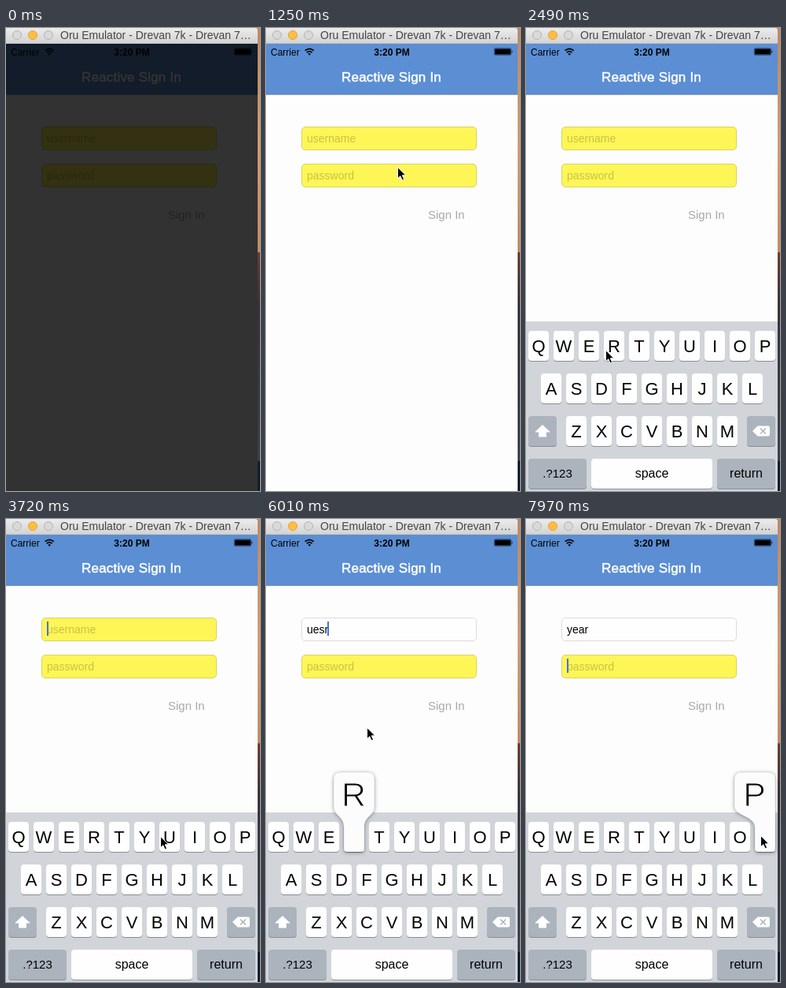
Animation, 323 px wide and 587 px high, one loop 8000 ms. Source, as an HTML page:

```html
<!DOCTYPE html>
<html lang="en">
<head>
<meta charset="utf-8">
<title>Sign in</title>
<style>
html, body { margin: 0; width: 100%; height: 100%; overflow: hidden; background: #fff; }
svg { display: block; width: 323px; height: 587px; font-family: "Liberation Sans", Arial, sans-serif; }
.mid { text-anchor: middle; }
.hint { fill: #c9c246; font-size: 14px; }
.value { fill: #000; font-size: 14px; }
.big { font-size: 43px; stroke: #fcfcfc; stroke-width: 1.2px; }
</style>
</head>
<body>
<svg viewBox="0 0 323 587">
  <defs>
    <linearGradient id="bar" x2="0" y2="1"><stop stop-color="#ececec"/><stop offset="1" stop-color="#d2d2d2"/></linearGradient>
    <linearGradient id="desk" x2="0" y2="1">
      <stop stop-color="#bd8862"/><stop offset=".25" stop-color="#d49c6f"/>
      <stop offset=".484" stop-color="#c58b60"/><stop offset=".485" stop-color="#6d3d32"/>
      <stop offset=".6" stop-color="#38323a"/><stop offset=".935" stop-color="#3b414e"/>
      <stop offset=".936" stop-color="#101d2e"/><stop offset="1" stop-color="#101d2e"/>
    </linearGradient>
    <filter id="soft" x="-30%" y="-30%" width="160%" height="160%">
      <feDropShadow dx="0" dy="1" stdDeviation="2.6" flood-color="#000" flood-opacity=".36"/>
    </filter>
  </defs>

  <rect width="323" height="587" fill="url(#desk)"/>
  <rect y="20" width="320" height="567" fill="#fdfdfd"/>
  <rect y="20" width="320" height="64" fill="#5b8ed3"/>
  <rect y="84" width="320" height="1" fill="#8a9db8"/>

  <text x="6" y="35" font-size="12">Carrier</text>
  <g fill="none" stroke="#000" stroke-width="1.7">
    <path d="M49.6 28.6q5.6-4.6 11.2 0M51.8 31q3.4-2.8 6.8 0"/>
    <path d="M55.2 34.8l-1.8-2q1.8-1.4 3.6 0z" fill="#000" stroke="none"/>
  </g>
  <text class="mid" x="160" y="35" font-size="12" font-weight="700">3:20 PM</text>
  <rect x="290.250" y="25.750" width="21.500" height="8.500" rx="1.5" fill="none" stroke="#000" stroke-width=".5"/>
  <rect x="291" y="26.500" width="20" height="7" rx=".8"/>
  <path d="M312.500 28.500q2 1.500 0 3z"/>

  <g id="fields"></g>
  <text class="mid" x="159.5" y="68" font-size="17" letter-spacing=".2" fill="#fff" stroke="#fff" stroke-width=".5">Reactive Sign In</text>
  <text x="206" y="242" font-size="15" fill="#a8a8a8">Sign In</text>
  <rect id="shade" y="20" width="320" height="567"/>

  <path d="M0 0H317Q320 0 320 3V20H0z" fill="url(#bar)"/>
  <rect y="19" width="320" height="1" fill="#bfbfbf"/>
  <g stroke-width="1">
    <circle cx="14" cy="9" r="5.5" fill="#d9d9d9" stroke="#b4b4b4"/>
    <circle cx="34" cy="9" r="5.5" fill="#fdbe41" stroke="#e0a43a"/>
    <circle cx="54" cy="9" r="5.5" fill="#d9d9d9" stroke="#b4b4b4"/>
  </g>
  <text x="69" y="14" font-size="14" fill="#454545">Oru Emulator - Drevan 7k - Drevan 7…</text>

  <g id="board"></g>
  <g id="popup">
    <path fill="#fcfcfc" stroke="#000" stroke-opacity=".14" stroke-width=".6" filter="url(#soft)"/>
    <text class="mid big"></text>
  </g>
  <path id="pointer" d="M.5 .5V14.7L3.8 11.7L6.1 16.9L8.6 15.8L6.3 10.8H10.7Z" stroke="#fff" stroke-width="1"/>
</svg>

<script>
const LOOP = 8000, TICK = 177, REST = 372;
const $ = id => document.getElementById(id);

function add(parent, tag, attrs, text) {
  const el = document.createElementNS("http://www.w3.org/2000/svg", tag);
  set(el, attrs);
  if (text) el.textContent = text;
  return parent.appendChild(el);
}
function set(el, attrs) {
  for (const name in attrs) el.setAttribute(name, attrs[name]);
}
function show(el, on) { el.style.display = on ? "" : "none"; }

// Text fields
function makeField(y, placeholder) {
  const g = $("fields");
  return {
    box: add(g, "rect", { x: 45.5, y: y + .5, width: 222, height: 29, rx: 4.5 }),
    hint: add(g, "text", { x: 52, y: y + 20, class: "hint" }, placeholder),
    value: add(g, "text", { x: 52, y: y + 20, class: "value" }),
    caret: add(g, "rect", { y: y + 5, width: 2, height: 18, fill: "#4b6fdc" })
  };
}
function drawField(f, text, valid, caret) {
  set(f.box, valid ? { fill: "#fefefe", stroke: "#dcdcdc" } : { fill: "#fef656", stroke: "#d9d264" });
  f.value.textContent = text;
  show(f.hint, !text);
  show(f.caret, caret);
  if (caret) set(f.caret, { x: 52 + (text ? Math.floor(f.value.getComputedTextLength()) - 1 : 0) });
}
const user = makeField(125, "username");
const pass = makeField(172, "password");

// Keyboard, laid out at its resting height
const board = $("board"), keys = {};
add(board, "rect", { y: REST, width: 320, height: 215, fill: "#d1d5da" });
function key(x, y, w, label, size = 22, fill = "#fefefe") {
  add(board, "rect", { x, y: y + 1, width: w, height: 38, rx: 4, fill: "#898c91" });
  add(board, "rect", { x, y, width: w, height: 38, rx: 4, fill });
  add(board, "text", { x: x + w / 2, y: y + (size > 20 ? 27 : 24), class: "mid", "font-size": size }, label);
  if (label.length === 1) keys[label] = { x, y };
}
["QWERTYUIOP", "ASDFGHJKL", "ZXCVBNM"].forEach((row, r) =>
  [...row].forEach((c, i) => key([3, 19, 51][r] + 32 * i, 384 + 54 * r, 26, c)));
const GREY = "#abb3bd";
key(3, 492, 36, "", 16, GREY);
key(281, 492, 36, "", 16, GREY);
key(3, 546, 74, ".?123", 15, GREY);
key(83, 546, 154, "space", 16);
key(243, 546, 74, "return", 16, GREY);
add(board, "path", { d: "M21 503L31 512.500H26V518.500H16V512.500H11z", fill: "#fff" });
add(board, "path", { d: "M288 511L294.500 504.500H308Q310 504.500 310 506.500V515.500Q310 517.500 308 517.500H294.500z", fill: "#fff" });
add(board, "path", { d: "M298 507.500L305 514.500M305 507.500L298 514.500", stroke: GREY, "stroke-width": 1.5 });

function drawPopup(letter) {
  const g = $("popup"), k = keys[letter];
  show(g, k);
  if (!k) return;
  const { x, y } = k, l = Math.min(x - 13, 265), r = l + 52, e = x + 26, top = y - 63;
  set(g.children[0], {
    d: `M${l + 9} ${top}H${r - 9}Q${r} ${top} ${r} ${top + 9}V${y - 20}` +
       `C${r} ${y - 7} ${e} ${y - 8} ${e} ${y + 7}V${y + 34}Q${e} ${y + 38} ${e - 4} ${y + 38}` +
       `H${x + 4}Q${x} ${y + 38} ${x} ${y + 34}V${y + 7}` +
       `C${x} ${y - 8} ${l} ${y - 7} ${l} ${y - 20}V${top + 9}Q${l} ${top} ${l + 9} ${top}z`
  });
  set(g.children[1], { x: l + 25.5, y: y - 20 });
  g.children[1].textContent = letter;
}

// Pointer way points: tick, x, y
const PATH = [
  [4, 262, 276], [6, 195, 210], [8, 139, 141], [9, 134, 152], [11, 134, 152],
  [13, 106, 370], [14, 101, 408], [16, 101, 408], [18, 150, 398], [20, 194, 402],
  [22, 198, 402], [23, 198, 402], [26, 74, 397], [27, 70, 396], [28, 70, 396],
  [30, 60, 455], [31, 60, 455], [33, 112, 402], [34, 128, 264], [36, 142, 194],
  [38, 145, 186], [40, 145, 186], [43, 280, 385], [44, 298, 401], [45, 298, 401]
];
function pointerAt(n) {
  const i = Math.max(1, PATH.findIndex(p => p[0] >= n));
  const a = PATH[i - 1], b = PATH[i], u = (n - a[0]) / (b[0] - a[0]);
  return [1, 2].map(j => Math.round(a[j] + (b[j] - a[j]) * u));
}

const PRESSED = { 22: "U", 27: "E", 30: "S", 34: "R", 45: "P" };
// Value of the last entry whose tick has been reached
const latest = (list, n) => list.reduce((v, [at, next]) => n >= at ? next : v, list[0][1]);
const TYPED = [[0, ""], [23, "u"], [28, "ue"], [31, "ues"], [34, "uesr"], [40, "year"]];

function draw(t) {
  const n = Math.min(45, Math.floor((t + 12) / TICK));
  set($("shade"), { opacity: [.8, .045][n] || 0 });

  const blink = n % 5 < 3;
  drawField(user, latest(TYPED, n), n >= 34, n >= 10 && n < 39 && (blink || n === 27 || n === 34));
  drawField(pass, "", false, n >= 40 && blink);

  show(board, n >= 10);
  set(board, { transform: `translate(0 ${n === 10 ? 49 : 0})` });
  drawPopup(PRESSED[n]);

  show($("pointer"), n >= 4);
  if (n >= 4) set($("pointer"), { transform: `translate(${pointerAt(n)})` });
}

const start = performance.now();
function loop() {
  draw((performance.now() - start) % LOOP);
  requestAnimationFrame(loop);
}
loop();
</script>
</body>
</html>
```
